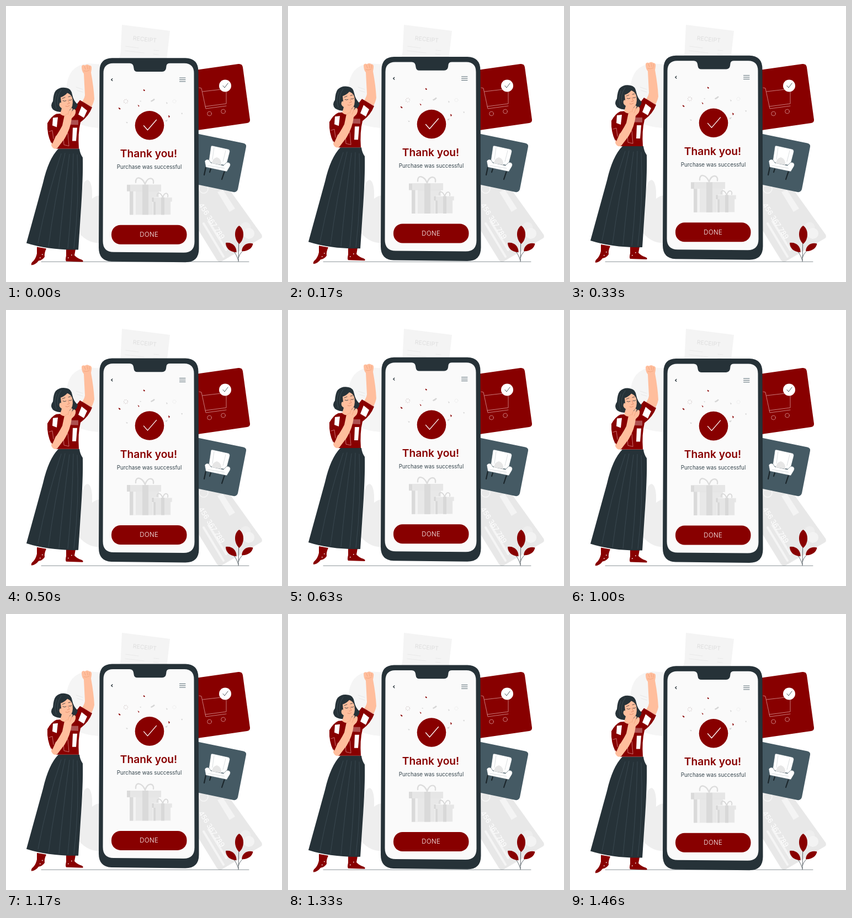
These frames come from a looping animation (500 by 500 pixels, 1.5 s). An HTML page:

```html
<!DOCTYPE html>
<html lang="en">
<head>
<meta charset="utf-8">
<title>Thank you</title>
<style>
  html, body { margin: 0; width: 100%; height: 100%; overflow: hidden; background: #fff; }
  svg { display: block; width: 100%; height: 100%; }
  text { font-family: Inter, sans-serif; text-anchor: middle; }
  .red { fill: #880000; }
  .dark { fill: #263238; }
  .skin { fill: #ffbe9d; }
  .white { fill: #fff; }
  .line { fill: none; stroke-linecap: round; stroke-linejoin: round; }
</style>
</head>
<body>
<svg viewBox="0 0 500 500">
  <!-- Pale backdrop -->
  <path fill="#f5f5f5" d="M109 152Q111 107 149 104L175 106V221Q153 221 136 215Q109 190 109 152Z"/>
  <path class="line" stroke="#e8e8e8" d="M127 147L139 151M129 153L139 156"/>
  <path fill="#eee" d="M137 350Q137 316 148 315Q157 318 156 349Q164 342 175 343V429Q150 432 132 411Z"/>

  <g id="receipt">
    <path fill="#f4f4f4" d="M210 34L297 45L291 98H203Q208 90 208 76Z"/>
    <text transform="translate(251 64) rotate(6)" font-size="10.5" fill="#dedede">RECEIPT</text>
    <path class="line" stroke="#e6e6e6" stroke-width=".8" d="M217 73L240 76M268 80L277 81M216 81L250 85M267 87L276 88"/>
  </g>

  <g id="credit-card">
    <path fill="#e8e8e8" d="M345 318L397 326Q402 328 405 333L463 414Q466 419 460 422L392 462Q386 466 382 460L345 400Z"/>
    <path fill="#f4f4f4" d="M383 337L393 333L415 367L405 373Z"/>
    <path class="line" stroke="#f5f5f5" stroke-width="4" stroke-linecap="butt" d="M358 394L394 454M367 390L399 442"/>
    <circle cx="434" cy="401" r="9.500" fill="#eee"/>
    <circle cx="440" cy="412" r="10" fill="#f3f3f3"/>
    <circle cx="358" cy="331" r="8" fill="none" stroke="#f6f6f6" stroke-width="1.500"/>
    <text transform="translate(369 392) rotate(57)" font-size="12.500" fill="#fff">456 367 789</text>
  </g>

  <g id="cart-card">
    <path class="red" d="M340 116.500L421 105Q428 104.300 429 111L442 206Q442.500 211 437 212L340 226Z"/>
    <g class="line" stroke="#d99a9a" stroke-width=".8">
      <path d="M350 148L354 149L362 186L399 181M356 155L399 150L399 177L361 182"/>
      <circle cx="368.500" cy="195" r="3.800"/>
      <circle cx="393.500" cy="191" r="3.800"/>
    </g>
    <circle class="white" cx="397" cy="144.500" r="11"/>
    <path class="line" stroke="#263238" stroke-width=".8" d="M393 144.500L396 148L402 140"/>
  </g>

  <g id="chair-card">
    <path fill="#455a64" d="M340 230L430 248.500Q436 250 435 255L420 332Q418 338 412 337L340 322Z"/>
    <path class="line" stroke="#1c272c" stroke-width="2.200" d="M362 292L359 306M371 295L369 301M396 299L391 314"/>
    <g class="white" stroke="#455a64" stroke-width=".6">
      <path d="M371 256Q371 252 376 253.500L401 259Q407 260 405 266L399 289L367 283Z"/>
      <path d="M360 281Q363 276 368 279L371 284L394 289L400 283Q408 283 406 290L400 300L362 292Z"/>
    </g>
    <path fill="#e6e6e6" d="M373 285Q374 276 382 274Q391 277 390 288Z"/>
    <path class="line" stroke="#c9ced1" stroke-width=".7" d="M377 256L374 278M398 262L393 282M366 289L396 294"/>
  </g>

  <path class="line" stroke="#5b666b" stroke-width=".7" d="M64 463.300H440"/>

  <g id="plant">
    <path class="line" stroke="#263238" stroke-width=".7" d="M421 463L422 410M421 461Q417 448 409 440M421 456Q424 445 438 437"/>
    <path class="red" d="M422.500 431C412 422 413 403 422.500 398C432 404 433 422 422.500 431Z"/>
    <path class="red" d="M417.500 446C405 446 398 438 398 429C410 427 418 436 417.500 446Z"/>
    <path class="red" d="M427 444C428 433 437 428 447.500 430.500C446 440 436 445 427 444Z"/>
  </g>

  <g id="floating">
    <g id="phone">
      <path class="dark" d="M169.500 118Q169.500 95 192 94.500H325Q348.500 95 348.500 119L349.500 440Q349.500 464.500 325 464.500L191 463Q168 462 168 438Z"/>
      <path fill="#fafafa" d="M176.500 122Q176.500 104.300 194 104H224Q230 104 231 110L231.500 113Q232 119.300 238 119.300H283Q289 119 290 113L290.500 109Q291 104 297 104H323Q340.500 104.300 340.500 122L341.500 427Q341.500 447 322 447L195 446Q175.500 446 175.500 426Z"/>
      <path class="line" stroke="#263238" stroke-width="1.300" d="M192.800 131.900L190.700 133.800L192.800 135.700"/>
      <path class="line" stroke="#455a64" stroke-width=".9" d="M314.500 130.500H325M314.500 133.800H325M314.500 137.100H325"/>

      <g id="confetti">
        <path class="red" d="M204 184L207.500 186L206.500 188L204 186ZM249 151L252 153L251 154.500L249 153.500ZM238.500 179L241.500 181L240.500 183ZM294 198L297 200L295 203Z"/>
        <path fill="#d5d5d5" d="M262 172Q266 170 268 168L270 169.500Q267 173 263 174ZM242 172L245 172L244 174ZM317 194L320 194L319 197ZM217 210L221 211L219 213ZM288 208L293 206L291 210ZM290 174L293 176L291 178Z"/>
        <circle cx="217" cy="173" r="3.500" fill="none" stroke="#b9aaaa" stroke-width="1.300" stroke-dasharray=".8 1.950"/>
        <circle cx="305" cy="173" r="3" fill="none" stroke="#e2e2e2" stroke-dasharray="1 1.360"/>
      </g>

      <circle class="red" cx="260" cy="216.500" r="26.300"/>
      <path class="line" stroke="#fff" stroke-width="1.300" d="M249.500 217L256.500 225L272.500 206.500"/>
      <text class="red" x="258.500" y="274.600" font-size="19.200" font-weight="600">Thank you!</text>
      <text x="259.500" y="295.600" font-size="9.800" fill="#37474f">Purchase was successful</text>

      <g id="gifts">
        <path fill="#e8e8e8" d="M224 336H277V378.500H224Z"/>
        <path fill="#dadada" d="M219 324H281V336H219ZM224 336H230V378.500H224Z"/>
        <path fill="#e6e6e6" d="M225 324H281V336H225Z"/>
        <path fill="#f3f3f3" d="M231 336H235V378.500H231Z"/>
        <path fill="#dadada" d="M247 324H258V378.500H247Z"/>
        <path class="line" stroke="#dcdcdc" stroke-width="2.400" d="M252 323C246 309 234 308 235 320M252 323C257 308 269 311 267 321"/>
        <path fill="#e6e6e6" stroke="#fafafa" stroke-width=".7" d="M264 347H301V355H298.500V378.500H266.500V355H264Z"/>
        <path fill="#d8d8d8" d="M267 355H271V378.500H267ZM281 347H287V378.500H281ZM264 347H268V355H264Z"/>
        <path class="line" stroke="#d8d8d8" stroke-width="1.800" d="M284 347C279 336 273 338 274 345M284 347C288 335 295 340 293 346"/>
      </g>

      <rect class="red" x="191" y="397" width="136.500" height="35" rx="16.500"/>
      <text x="259.300" y="418.200" font-size="11.400" font-weight="300" letter-spacing=".4" fill="#fff">DONE</text>
    </g>

    <g id="woman" transform="translate(0 .8)">
      <path class="red" d="M56 436L73 439Q69 447 70 454Q66 460 59 461Q54 468 46 469Q45 465 49 462Q54 457 56 448ZM109 439L126 440L124 451Q128 456 137 459Q141 461 139 463L109 462Q107 460 109 452Z"/>
      <path class="white" d="M61 455h1.500v1.500h-1.500ZM65 449h1.500v1.500h-1.500ZM112 455h1.500v1.500h-1.500ZM118 450h1.500v1.500h-1.500Z"/>

      <path class="dark" d="M95 258H133Q134 267 139 274Q140 310 135 380L131 441Q78 442 37 429Q56 360 67 320Q77 276 95 258Z"/>
      <path class="line" stroke="#4c5d66" stroke-width=".5" d="M100 267Q75 340 58 429M107 266Q88 350 77 435M115 268Q103 360 96 437M122 267Q120 360 112 438M129 269Q133 355 123 438"/>

      <!-- Raised arm -->
      <path class="skin" d="M137 109Q138 105 143 107Q147 104 151 107Q156 107 155 114L154 120Q159 147 160 168Q158 179 151 188L133 179Q142 169 143 161L141 122Q137 118 137 109Z"/>
      <path class="line" stroke="#eb996e" stroke-width=".6" d="M142 109L144 114M147 108L148 114M151 109V114M141 117Q146 119 151 116"/>

      <path class="red" d="M134 170L156 183Q150 199 135 210Q130 230 132 258H91Q94 240 89 231L82 248Q74 232 75 212Q82 199 91 195Q117 194 134 170Z"/>
      <path class="white" d="M137 181L147 189L141 202L131 196ZM121 220H129L127 244H120Z"/>
      <path fill="#ad5050" d="M104 206H131V215L104 214Z"/>
      <path class="line" stroke="#e2a1a1" stroke-width=".7" d="M112 230L114 253L105 251L104 237M142 174L154 182"/>

      <!-- Head -->
      <path class="dark" d="M90 153Q98 145 110 148Q118 149 120 160Q122 171 130 178Q128 189 117 191Q94 194 85 187Q79 180 85 172Q86 158 90 153Z"/>
      <path class="skin" d="M99 165Q107 162 111 157Q119 160 120.500 168Q122.500 183 115 188L114 195Q107 202 98 195L101 185Q95 181 97 176Q98 173 100 175Z"/>
      <path class="line" stroke="#263238" stroke-width=".8" d="M103 171Q106 173 109 171M114 170Q117 171 119 169M102 167L107 165M113 164L117 163"/>
      <path class="line" stroke="#d98363" stroke-width=".8" d="M112 170L115 176L111 177M108 181Q111 183 115 180"/>
      <path class="line" stroke="#53636b" stroke-width=".5" d="M92 158Q86 171 91 185M100 152Q91 164 94 178"/>

      <!-- Bent arm with hand at the chin -->
      <path class="skin" d="M83 246Q95 230 102 216L106 197Q106 190 111 185L114 184L114 190L119 184L121 186L119 191L123 186L126 188Q127 193 124 198L119 203Q117 222 106 240L93 257Q86 261 82 252Z"/>
      <path class="line" stroke="#eb996e" stroke-width=".6" d="M114 190L112 196M119 191L116 198M106 199L110 195"/>
      <path class="red" d="M75 212Q81 203 89 207L92 231L84 249Q75 235 75 212Z"/>
      <path class="white" d="M85 202L94 201L92 219L84 216Z"/>
      <path class="line" stroke="#e2a1a1" stroke-width=".7" d="M78 227L84 225L86 240"/>
    </g>
  </g>
</svg>
<script>
  const LOOP = 1500, RISE = 10, LEAD = 20;
  const floating = document.getElementById("floating");
  const start = performance.now();

  // Linear rise for half the loop, linear fall for the rest.
  function draw() {
    const phase = (performance.now() - start + LEAD) / LOOP % 1;
    const lift = RISE * (1 - Math.abs(2 * phase - 1));
    floating.setAttribute("transform", `translate(0 ${-lift})`);
    requestAnimationFrame(draw);
  }
  draw();
</script>
</body>
</html>
```
